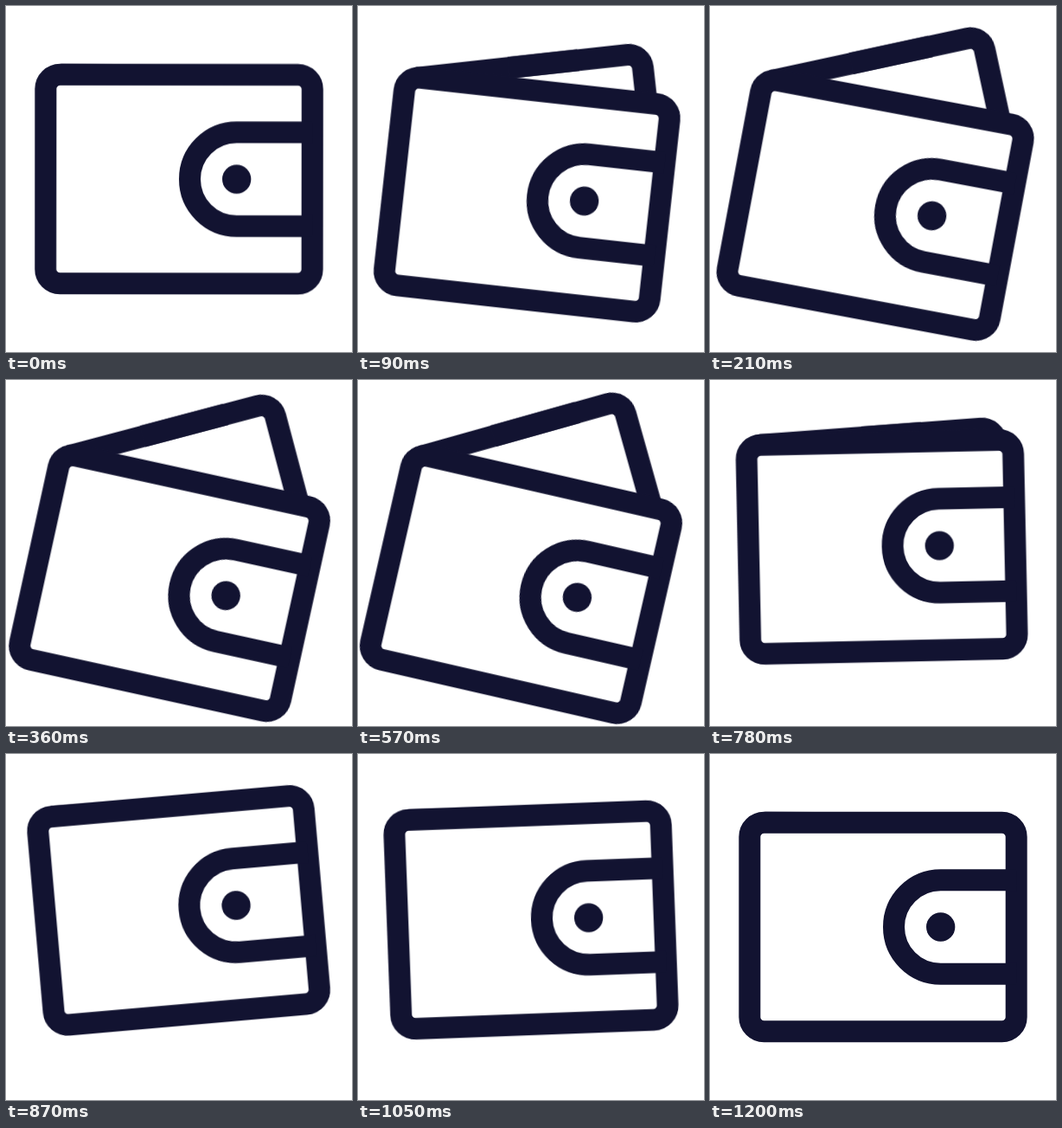
An HTML page that plays this animation: 400x400 px, repeating every 3.23 s.

```html
<!DOCTYPE html>
<html lang="en">
<head>
<meta charset="utf-8">
<title>Wallet</title>
<style>
  html, body {
    margin: 0;
    width: 100%;
    height: 100%;
    overflow: hidden;
    background: #fff;
  }
  svg {
    display: block;
    width: 100%;
    height: 100%;
    fill: none;
    stroke: #121331;
    stroke-width: 25;
  }
  /* Default easing for every swing; the opening keyframes override it */
  .wallet, .card, .edge {
    animation: wallet 3230ms cubic-bezier(.333, 0, .667, 1) infinite;
  }
  .wallet { transform-origin: 33px 167px; }
  .card {
    transform-origin: 62.5px 95.83px;
    animation-name: card;
  }
  .edge { animation-name: edge; }

  /* Tilt forward, swing back past level, settle, rest */
  @keyframes wallet {
    0% {
      transform: translate(0, 0) rotate(0deg);
      animation-timing-function: cubic-bezier(.2, .58, .2, 1);
    }
    17.647% { transform: translate(0, 0) rotate(12.9deg); }
    26.935% { transform: translate(-2.6px, -4.5px) rotate(-5deg); }
    37.152%, 100% { transform: translate(0, 0) rotate(0deg); }
  }
  /* The card fans out of the wallet and slips back in */
  @keyframes card {
    0% {
      transform: rotate(1deg);
      animation-timing-function: cubic-bezier(.2, .51, .2, 1);
    }
    17.647% { transform: rotate(-28.6deg); }
    26.161%, 100% { transform: rotate(1deg); }
  }
  @keyframes edge {
    0% {
      transform: translateX(-14px);
      animation-timing-function: cubic-bezier(.2, .51, .2, 1);
    }
    17.647% { transform: translateX(-51px); }
    26.161%, 100% { transform: translateX(-14px); }
  }
</style>
</head>
<body>
<svg viewBox="0 0 400 400">
  <g class="wallet">
    <g class="card">
      <path d="M62.5 79.17H250"/>
      <path class="edge" d="M200 79.17H337.5a16.67 16.67 0 0 1 16.67 16.67V220"/>
    </g>
    <rect x="45.83" y="79.17" width="308.34" height="241.66" rx="16.67" fill="#fff"/>
    <path d="M354.17 145.83H266.67a54.17 54.17 0 0 0 0 108.34H354.17"/>
    <circle cx="266.67" cy="200" r="16.67" fill="#121331" stroke="none"/>
  </g>
</svg>
</body>
</html>
```
